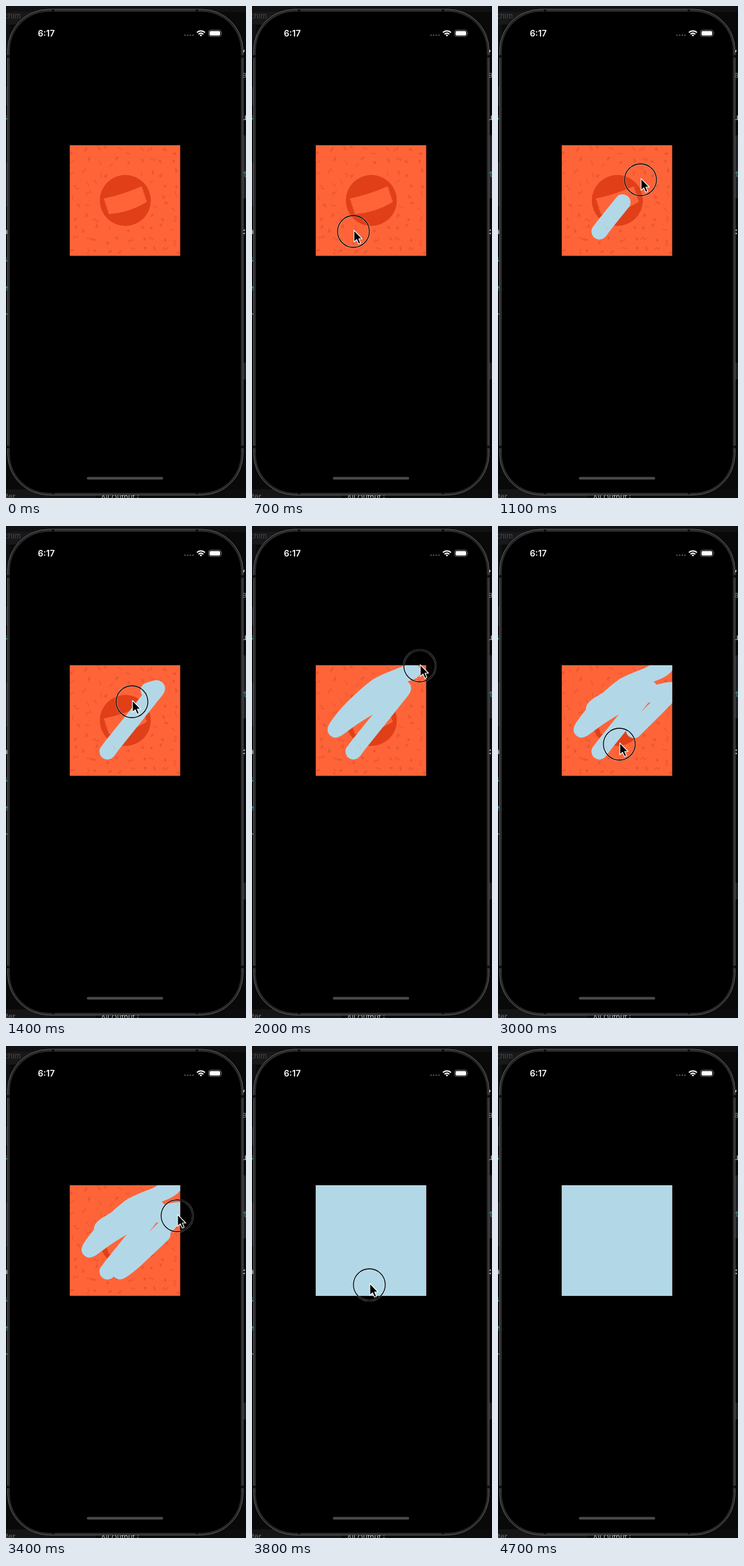
An HTML page for the animation above (5300 ms loop, 362 by 742 pixels).

```html
<!DOCTYPE html>
<html lang="en">
<head>
<meta charset="utf-8">
<title>Scratch card</title>
<style>
  html, body { margin: 0; width: 100%; height: 100%; overflow: hidden; background: #000; }
  svg { display: block; width: 362px; height: 742px; }
  text { font-family: Inter, "Liberation Sans", sans-serif; }
  .code text { font-family: "DejaVu Sans Mono", monospace; font-size: 13px; }
</style>
</head>
<body>
<svg viewBox="0 0 362 742">
  <defs>
    <clipPath id="card"><rect x="96.2" y="210" width="166.5" height="166.7"/></clipPath>
  </defs>

  <!-- desktop behind the phone -->
  <rect width="362" height="742" fill="#09090a"/>
  <path d="M0 0H362V9H0Z" fill="#111113"/>
  <path d="M0 9H40V28H0Z" fill="#18181a"/>
  <path d="M0 28H6V76H0Z" fill="#111113"/>
  <path d="M0 122H2V150H0ZM0 236H2V302H0Z" fill="#1b1b1d"/>
  <path d="M357 195H362V290H357ZM357 538H362V563H357Z" fill="#212123"/>
  <path d="M0 729H135V742H0Z" fill="#161618"/>
  <path d="M135 729H362V742H135Z" fill="#0c0c0d"/>
  <text x="-3" y="19" font-size="11" fill="#48484c">chIm</text>
  <text x="0" y="744" font-size="11" fill="#6c6c70">ter</text>
  <text x="143" y="744.5" font-size="11" fill="#b8b8ba">All Output ⁝</text>
  <g class="code">
    <text x="355" y="68" fill="#ddd">,</text>
    <text x="356" y="108" fill="#45b97c">a</text>
    <text x="355" y="172" fill="#ccc">u</text>
    <text x="357" y="258" fill="#3c9a8c">t</text>
    <text x="355.5" y="344" fill="#eee">:</text>
    <text x="-5" y="172" fill="#3c9a6c">s</text>
    <text x="-5" y="344" fill="#bbb">a</text>
    <text x="-5" y="386" fill="#3b92aa">s</text>
    <text x="-5" y="429" fill="#3b92aa">e</text>
    <text x="-5" y="471" fill="#bbb">r</text>
  </g>

  <!-- phone -->
  <rect x="2.5" y="5" width="355" height="732.5" rx="62" fill="#1f1f20" stroke="#606062"/>
  <rect x="4.5" y="7" width="351" height="728.5" rx="60" fill="none" stroke="#343436"/>
  <path d="M71 5v4M288 5v4M71 733v4M288 733v4M2 76h4M354 76h4M2 665h4M354 665h4" stroke="#111" stroke-width="4"/>
  <rect x="6" y="9" width="348" height="725" rx="58" fill="#000"/>

  <!-- status bar -->
  <text x="48" y="45.5" font-size="13" font-weight="600" fill="#fff">6:17</text>
  <g fill="#484848">
    <circle cx="270" cy="44" r="1.3"/><circle cx="274" cy="44" r="1.3"/>
    <circle cx="278" cy="44" r="1.3"/><circle cx="282" cy="44" r="1.3"/>
  </g>
  <g fill="none" stroke="#fff" stroke-width="2">
    <path d="M288 40a8.4 8.4 0 0 1 12 0M290.4 42.6a5 5 0 0 1 7.2 0"/>
    <path d="M292.2 43.9a2.6 2.6 0 0 1 3.6 0L294 46Z" fill="#fff" stroke="none"/>
  </g>
  <rect x="305.5" y="36.3" width="19" height="9.6" rx="2.8" fill="none" stroke="#666"/>
  <rect x="307" y="37.8" width="16" height="6.6" rx="1.6" fill="#fff"/>
  <path d="M325.7 39.6q1.4 1.5 0 3Z" fill="#777"/>

  <rect x="122" y="710.3" width="115" height="4" rx="2" fill="#494949"/>

  <!-- scratch card -->
  <g clip-path="url(#card)">
    <rect x="96" y="209" width="168" height="169" fill="#ff6439"/>
    <g id="confetti" fill="none" stroke="#d9532e" stroke-linecap="round" opacity=".65"></g>
    <circle cx="180" cy="293.2" r="38.5" fill="#e03f18"/>
    <path id="ticket" transform="translate(180 293) rotate(-18)" fill="#ff6439"/>
    <path id="ink" fill="none" stroke="#b2d8e7" stroke-width="24" stroke-linecap="round" stroke-linejoin="round"/>
    <rect id="prize" x="96" y="209" width="168" height="169" fill="#b2d8e7"/>
  </g>

  <g id="pointer">
    <circle r="24" fill="none" stroke="#fff" stroke-opacity=".4" stroke-width="2.6"/>
    <circle r="24" fill="none" stroke="#000" stroke-width="1.3"/>
    <path d="M.8-1.8V16L4.9 12.2 7.8 18.8 10.8 17.5 8 11H13.2Z" fill="#000" stroke="#fff" stroke-width="1.1" stroke-linejoin="round"/>
  </g>
</svg>

<script>
const LOOP = 5300, STEP = 100;
const DRAG_START = 7, REVEAL = 37, RELEASE = 40, TAP = 2;
const TAP_AT = [136, 362];

// Pointer positions while dragging, one per step.
const drag = [
  [153, 340], [154, 339], [163, 327], [188, 296], [215, 262], [228, 245],
  [215, 248], [190, 265], [155, 287], [126, 307], [147, 279], [190, 241],
  [242, 219], [253, 211], [246, 214], [203, 239], [162, 263], [145, 275],
  [152, 284], [200, 262], [246, 250], [261, 251], [205, 308], [183, 329],
  [172, 340], [190, 327], [236, 284], [258, 256], [235, 292], [203, 330],
  [182, 354], [177, 360]
];

const $ = id => document.getElementById(id);
const ink = $("ink"), prize = $("prize"), pointer = $("pointer");

// Catmull-Rom spline as cubic Béziers, softened to avoid loops at turns.
function spline(pts) {
  let d = `M${pts[0]}`;
  const at = i => pts[Math.max(0, Math.min(pts.length - 1, i))];
  for (let i = 0; i < pts.length - 1; i++) {
    const [a, b, c, e] = [at(i - 1), at(i), at(i + 1), at(i + 2)];
    const p = [0, 1].map(k => b[k] + (c[k] - a[k]) / 8);
    const q = [0, 1].map(k => c[k] - (e[k] - b[k]) / 8);
    d += `C${p} ${q} ${c}`;
  }
  return d;
}

// A ticket with sagging long edges and notched short ones.
function ticketPath() {
  const w = 29, h = 12.5, teeth = 7, size = 2 * h / teeth;
  let d = `M${-w} ${-h}Q0 ${-h + 3} ${w} ${-h}`;
  for (let i = 0; i < teeth; i++) d += `l2 ${size / 2}l-2 ${size / 2}`;
  d += `Q0 ${h + 7} ${-w} ${h}`;
  for (let i = 0; i < teeth; i++) d += `l-2 ${-size / 2}l2 ${-size / 2}`;
  return d + "Z";
}

function confetti() {
  let seed = 29;
  const rnd = () => (seed = seed * 16807 % 2147483647) / 2147483647;
  const shapes = [
    '<path d="M-4 1q2-5 4-1t4-1" stroke-width="1.4"/>',
    '<circle r="2.1" fill="#d9532e" stroke="none"/>',
    '<path d="M-2.5 3L0-4L2.5 3Z" fill="#d9532e" stroke="none"/>',
    '<path d="M-2 0H2" stroke-width="2.8"/>',
    '<path d="M-3 1L3-1" stroke-width="1.3"/>'
  ];
  let out = "";
  for (let row = 0; row < 10; row++) {
    for (let col = 0; col < 10; col++) {
      const x = 104 + col * 16.8 + (rnd() - .5) * 11;
      const y = 218 + row * 16.8 + (rnd() - .5) * 11;
      const turn = rnd() * 360, shape = shapes[Math.floor(rnd() * shapes.length)];
      if (Math.hypot(x - 180, y - 293) > 43)
        out += `<g transform="translate(${x} ${y}) rotate(${turn})">${shape}</g>`;
    }
  }
  return out;
}

function draw(step) {
  const dragging = step >= DRAG_START && step < RELEASE;
  const i = step - DRAG_START;
  const pos = dragging ? drag[Math.min(i, drag.length - 1)] : step === TAP ? TAP_AT : null;
  pointer.style.display = pos ? "" : "none";
  if (pos) pointer.setAttribute("transform", `translate(${pos})`);

  // The paint trails the pointer by one step.
  ink.setAttribute("d", i >= 2 && step < REVEAL ? spline(drag.slice(0, i)) : "");
  prize.style.display = step >= REVEAL ? "" : "none";
}

$("ticket").setAttribute("d", ticketPath());
$("confetti").innerHTML = confetti();

const start = performance.now();
function tick() {
  draw(Math.floor((performance.now() - start) % LOOP / STEP));
  requestAnimationFrame(tick);
}
tick();
</script>
</body>
</html>
```
